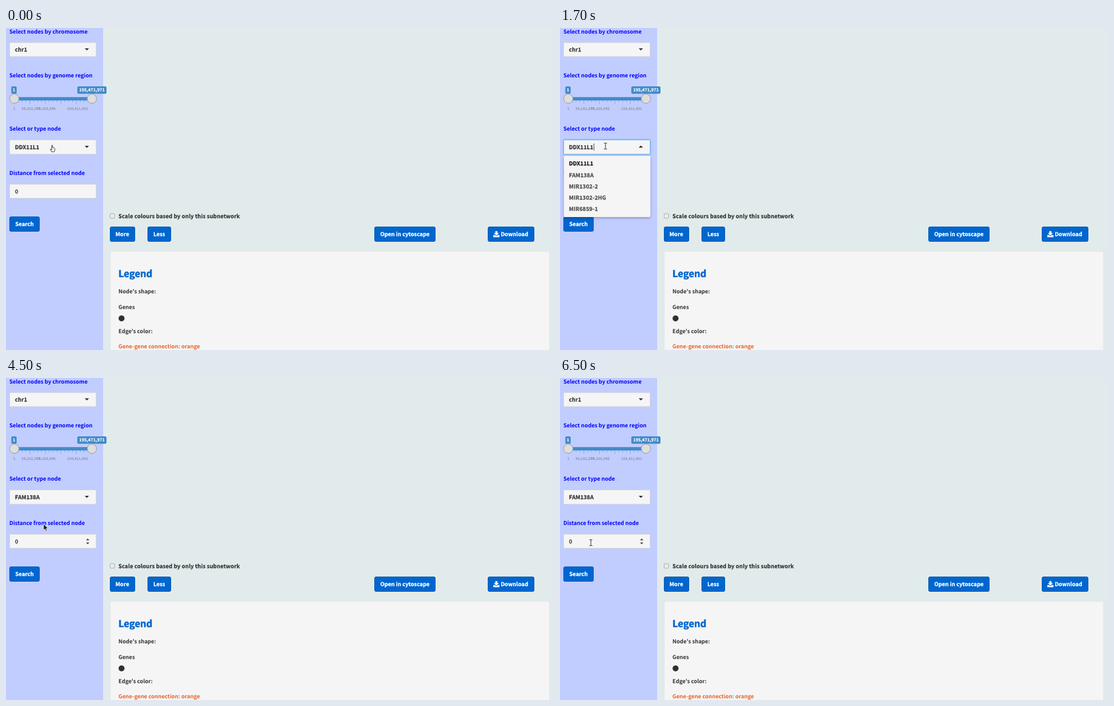
An HTML page that plays this animation: 976 px wide and 574 px high, repeating every 8 s.

```html
<!DOCTYPE html>
<html lang="en">
<head>
<meta charset="utf-8">
<title>Node search</title>
<style>
html, body { margin: 0; width: 100%; height: 100%; overflow: hidden; background: #e2ebeb; }
svg { display: block; width: 976px; height: 574px; }
text { font: 700 9.7px "Noto Sans CJK JP", "Noto Sans CJK SC", "Noto Sans CJK KR", "Noto Sans", sans-serif; fill: #333; text-rendering: geometricPrecision; }
.label { fill: #00f; }
.mid { text-anchor: middle; }
.white { fill: #fff; }
.heavy { letter-spacing: .14px; stroke: #333; stroke-width: .25; }
.btn { fill: #0066cf; stroke: #0056b0; }
.cap { fill: #fff; stroke: #fff; stroke-width: .3; letter-spacing: .06px; text-anchor: middle; }
.field { fill: #f5f5f5; stroke: #d2d2d2; }
.tag { fill: #428bca; }
text.num { font-size: 7.6px; fill: #fff; stroke: #fff; stroke-width: .2; text-anchor: middle; }
.knob { fill: #dedede; stroke: #999; }
text.tick { font-size: 6.3px; fill: #8f929c; text-anchor: middle; }
.grid { stroke: #8e97bb; stroke-width: .8; }
.options text { fill: #4c4c4c; stroke: #4c4c4c; }
.options .on { fill: #161616; stroke: #161616; }
.hand, .arrow, .beam { stroke-linejoin: round; stroke-linecap: round; }
.hand { fill: #fff; stroke: #222; stroke-width: .9; }
.arrow { fill: #111; stroke: #fff; stroke-width: .7; }
.beam { fill: none; stroke: #222; stroke-width: 1; }

/* one 8 s loop, hard cuts between the steps */
.step { visibility: hidden; animation: 8s step-end infinite; }
.closed { animation-name: closed; }
.typing { animation-name: typing; }
.picking { animation-name: picking; }
.open { animation-name: open; }
.picked { animation-name: picked; }
.leaving { animation-name: leaving; }
.hover { animation-name: hover; }
@keyframes closed  { 0% { visibility: visible } 6.25%, 100% { visibility: hidden } }
@keyframes typing  { 0% { visibility: hidden } 6.25% { visibility: visible } 31.25%, 100% { visibility: hidden } }
@keyframes picking { 0% { visibility: hidden } 31.25% { visibility: visible } 56.25%, 100% { visibility: hidden } }
@keyframes open    { 0% { visibility: hidden } 6.25% { visibility: visible } 56.25%, 100% { visibility: hidden } }
@keyframes picked  { 0% { visibility: hidden } 56.25%, 100% { visibility: visible } }
@keyframes leaving { 0% { visibility: hidden } 56.25% { visibility: visible } 81.25%, 100% { visibility: hidden } }
@keyframes hover   { 0% { visibility: hidden } 81.25%, 100% { visibility: visible } }
</style>
</head>
<body>
<svg viewBox="0 0 976 574">
  <defs>
    <path id="down" d="M.2 0h7.6l-3.8 3.8z" fill="#2c2c2c"/>
    <path id="up" d="M.2 3.8h7.6l-3.8-3.8z" fill="#2c2c2c"/>
    <path id="hand" d="M-1.6 1V-4.6Q-1.6-5.6-.8-5.6T0-4.6V-1.2L2.6-.8Q4 -.5 4 .8V3L3 6.2H-1.7L-4 2.4Q-4.4 1.2-3.2 1.2L-1.6 2.6Z"/>
    <path id="beam" d="M-2.3-5.3H-.8L0-4.8 .8-5.3H2.3M0-4.8V4.8M-2.3 5.3H-.8L0 4.8 .8 5.3H2.3"/>
    <filter id="glow" x="-10%" y="-30%" width="120%" height="160%"><feGaussianBlur stdDeviation="1.5"/></filter>
    <filter id="shade" x="-10%" y="-10%" width="120%" height="120%"><feDropShadow dx="0" dy="2" stdDeviation="2.2" flood-opacity=".28"/></filter>
  </defs>

  <rect width="976" height="574" fill="#e2ebeb"/>
  <rect width="173" height="574" fill="#c1cdff"/>

  <text class="label" x="6" y="9.5">Select nodes by chromosome</text>
  <rect class="field" x="6.5" y="26" width="154" height="25"/>
  <text class="heavy" x="16" y="41.8">chr1</text>
  <use href="#down" x="140" y="36.2"/>

  <text class="label" x="6" y="88.3">Select nodes by genome region</text>
  <g id="ticks" class="grid"></g>
  <rect class="tag" x="14" y="123.2" width="139" height="6"/>
  <rect class="tag" x="9.5" y="104" width="9.5" height="13.2" rx="2.5"/>
  <rect class="tag" x="127" y="104" width="52" height="13.2" rx="2.5"/>
  <text class="num" x="14.3" y="113.4">1</text>
  <text class="num" x="153" y="113.4">195,471,971</text>
  <circle class="knob" cx="14.8" cy="126" r="8.3"/>
  <circle class="knob" cx="153" cy="126" r="8.3"/>
  <text class="tick" x="14.8" y="145.6">1</text>
  <text class="tick" x="44.5" y="145.6">39,102,395</text>
  <text class="tick" x="71.5" y="145.6">78,205,996</text>
  <text class="tick" x="127.5" y="145.6">156,411,991</text>

  <text class="label" x="6" y="183.3">Select or type node</text>
  <text class="label" x="6" y="262">Distance from selected node</text>
  <rect class="field" x="6.5" y="278.5" width="154" height="25"/>
  <text x="16" y="294.8">0</text>
  <g class="step picked" fill="#444"><path d="M142.6 289.2h5.8l-2.9-3.2zM142.6 293.2h5.8l-2.9 3.2z"/></g>

  <rect class="btn" x="6.5" y="336.5" width="53" height="26" rx="2.5"/>
  <text class="cap" x="33" y="353.2">Search</text>

  <rect class="field" x="6.5" y="199.5" width="154" height="25.5"/>
  <g class="step open">
    <rect x="6.5" y="199.5" width="154" height="25.5" rx="1" fill="none" stroke="#66afe9" stroke-width="2" stroke-opacity=".7" filter="url(#glow)"/>
    <rect x="6.5" y="199.5" width="154" height="25.5" rx="1" fill="#f5f5f5" stroke="#5aa9ec"/>
    <use href="#up" x="140" y="209.5"/>
    <rect x="7" y="228" width="154" height="109" rx="1.5" fill="#f5f5f5" filter="url(#shade)"/>
  </g>
  <g class="step closed"><text class="heavy" x="16" y="215.8">DDX11L1</text><use href="#down" x="140" y="210"/></g>
  <g class="step picked"><text class="heavy" x="16" y="215.8">FAM138A</text><use href="#down" x="140" y="210"/></g>
  <g class="step open">
    <text class="heavy" x="16" y="215.8">DDX11L1</text>
    <g class="options">
      <text class="heavy" x="16" y="285.8">MIR1302-2</text>
      <text class="heavy" x="16" y="306">MIR1302-2HG</text>
      <text class="heavy" x="16" y="326.2">MIR6859-1</text>
    </g>
  </g>
  <g class="step typing options">
    <text class="heavy on" x="16" y="245.3">DDX11L1</text>
    <text class="heavy" x="16" y="265.5">FAM138A</text>
    <path d="M60.5 206V218.5" stroke="#333" stroke-width=".9"/>
  </g>
  <g class="step picking options">
    <text class="heavy" x="16" y="245.3">DDX11L1</text>
    <text class="heavy on" x="16" y="265.5">FAM138A</text>
  </g>

  <rect x="185.5" y="331" width="8" height="8" rx="1.5" fill="#ececec" stroke="#a5a5a5"/>
  <text class="heavy" x="200.3" y="338.6">Scale colours based by only this subnetwork</text>

  <rect class="btn" x="185.5" y="354.5" width="44" height="26" rx="2.5"/>
  <text class="cap" x="207.2" y="371.2">More</text>
  <rect class="btn" x="252.5" y="354.5" width="41" height="26" rx="2.5"/>
  <text class="cap" x="273" y="371.2">Less</text>
  <rect class="btn" x="656.5" y="354.5" width="108" height="26" rx="2.5"/>
  <text class="cap" x="710.5" y="371.2">Open in cytoscape</text>
  <rect class="btn" x="858.5" y="354.5" width="82" height="26" rx="2.5"/>
  <path class="white" d="M871.6 362h3.6v3.6h2.8l-4.6 4.6-4.6-4.6h2.8zM868 369h2.8l2.6 2.3 2.6-2.3h2.8v4h-10.8z"/>
  <text class="cap" x="905.6" y="371.2">Download</text>

  <rect x="185.5" y="398" width="782.5" height="190" rx="2" fill="#f5f5f5" stroke="#dfe3e3"/>
  <text x="200.3" y="444" style="font-size:16.9px;fill:#0066cf;stroke:#0066cf;stroke-width:.5">Legend</text>
  <text x="200.3" y="473">Node's shape:</text>
  <text x="200.3" y="500.5">Genes</text>
  <circle cx="205.8" cy="517.6" r="5.3" fill="#2d3035"/>
  <text x="200.3" y="543.5">Edge's color:</text>
  <text x="200.3" y="571" style="fill:#e8632b">Gene-gene connection: orange</text>

  <g class="step closed"><use class="hand" href="#hand" x="83" y="214.5"/></g>
  <g class="step typing"><use class="beam" href="#beam" x="81" y="210.5"/></g>
  <g class="step picking"><use class="hand" href="#hand" x="69" y="266"/></g>
  <g class="step leaving"><path class="arrow" d="M67 260.6V271.2L69.5 268.9 71.2 272.8 72.9 272 71.3 268.3H74.6Z"/></g>
  <g class="step hover"><use class="beam" href="#beam" x="55" y="293.5"/></g>
</svg>
<script>
const ticks = document.getElementById("ticks");
for (let i = 0; i <= 20; i++) {
  const line = document.createElementNS("http://www.w3.org/2000/svg", "path");
  line.setAttribute("d", `M${14.8 + i * 6.91} 129V${i % 4 ? 132.5 : 135.5}`);
  ticks.append(line);
}
</script>
</body>
</html>
```
